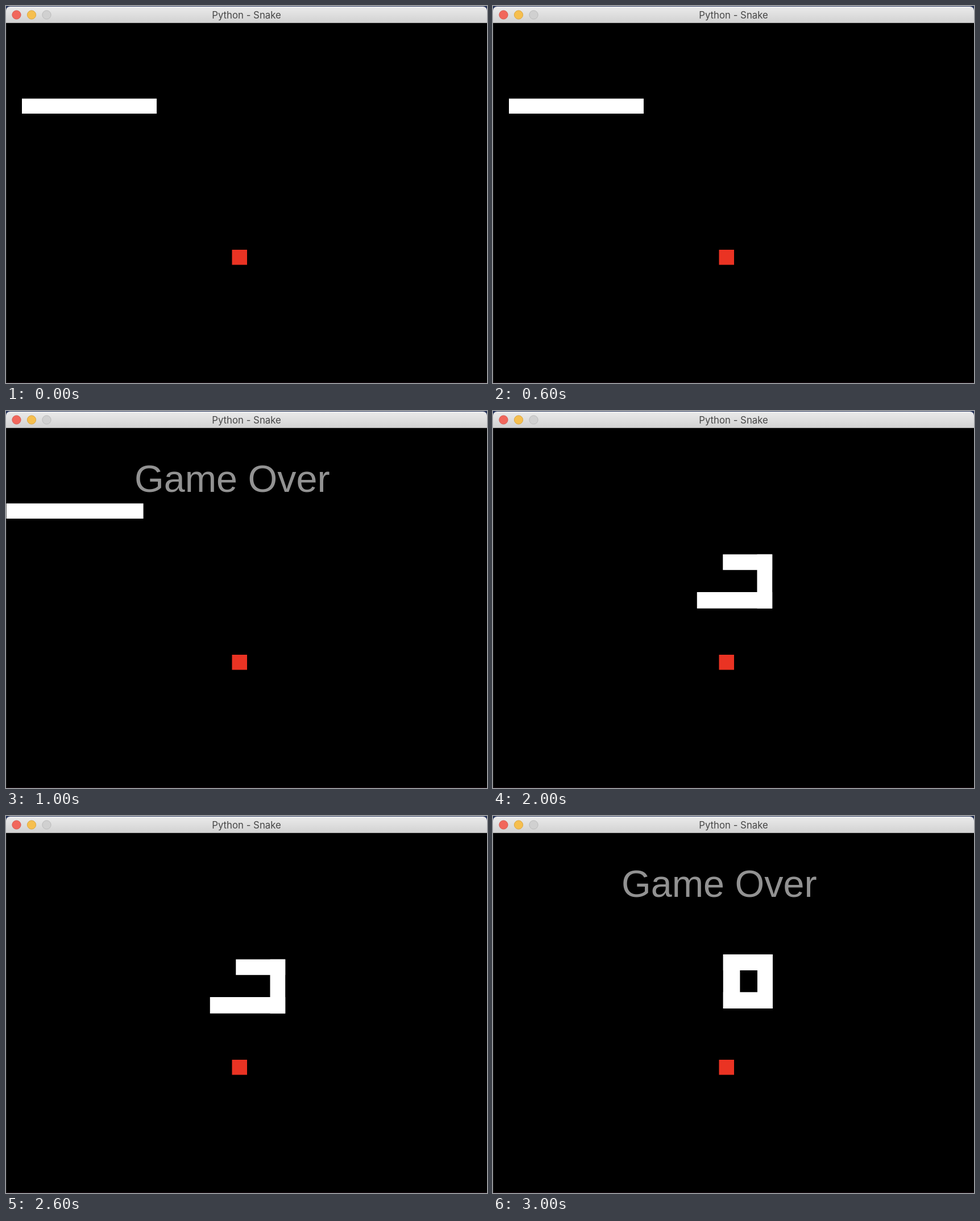
Animation, 846 px wide and 662 px high, one loop 4 s. Source, as an HTML page with a canvas:

```html
<!DOCTYPE html>
<html lang="en">
<head>
<meta charset="utf-8">
<title>Snake</title>
<style>
html, body { margin: 0; width: 100%; height: 100%; overflow: hidden; background: #000; }
canvas { display: block; }
</style>
</head>
<body>
<canvas id="stage" width="846" height="662"></canvas>
<script>
const W = 846, H = 662, STEP = 1000;
const ctx = document.getElementById('stage').getContext('2d');

// Each scene: snake boxes as [left, top, right, bottom]
const scenes = [
  { snake: [[28, 162.6, 265, 189]] },
  { snake: [[0.7, 162.3, 241.6, 189]], over: true },
  { snake: [[404.3, 251.7, 491.2, 279.2], [464.5, 251.7, 491.2, 346.7], [358.8, 318, 491.2, 346.7]] },
  { snake: [[404.8, 243, 492, 271], [404.8, 309.3, 492, 338], [404.8, 243, 434.4, 338], [465, 243, 492, 338]], over: true }
];

function box([l, t, r, b], color) {
  ctx.fillStyle = color;
  ctx.fillRect(l, t, r - l, b - t);
}

function label(text, x, y, font, color, align) {
  ctx.font = font;
  ctx.fillStyle = color;
  ctx.textAlign = align;
  ctx.fillText(text, x, y);
}

function button(x, fill, edge) {
  ctx.beginPath();
  ctx.arc(x, 15.5, 7.6, 0, Math.PI * 2);
  ctx.fillStyle = fill;
  ctx.fill();
  ctx.strokeStyle = edge;
  ctx.lineWidth = 1;
  ctx.stroke();
}

function titleBar() {
  box([0, 0, W, 12], '#26345a');
  const shade = ctx.createLinearGradient(0, 1, 0, 29);
  shade.addColorStop(0, '#ebebeb');
  shade.addColorStop(1, '#d2d2d2');
  ctx.fillStyle = shade;
  ctx.beginPath();
  ctx.roundRect(0, 1, W, 28, [7, 7, 0, 0]);
  ctx.fill();
  box([7, 1, W - 7, 2], '#f5f5f5');
  box([0, 29, W, 30], '#a5a5a5');
  button(18.5, '#f1675c', '#d9574c');
  button(45, '#f6bf4f', '#dca63f');
  button(71.5, '#d0d0d0', '#bababa');
  label('Python - Snake', W / 2, 21.8, '16.8px Inter, sans-serif', '#474747', 'center');
}

function draw(scene) {
  box([0, 0, W, H], '#000');
  box([0, 30, 1, H], '#1b1b1b');
  box([0, H - 1, W, H], '#1c0b14');
  titleBar();
  scene.snake.forEach(part => box(part, '#fff'));
  box([397.5, 428, 424, 454.5], '#ea3323');
  if (scene.over) {
    label('Game Over', 226, 142, '66.5px "Liberation Sans", Arial, sans-serif', '#929292', 'left');
  }
}

const start = performance.now();
function tick() {
  const t = performance.now() - start;
  draw(scenes[Math.floor(t / STEP) % scenes.length]);
  requestAnimationFrame(tick);
}
tick();
</script>
</body>
</html>
```
